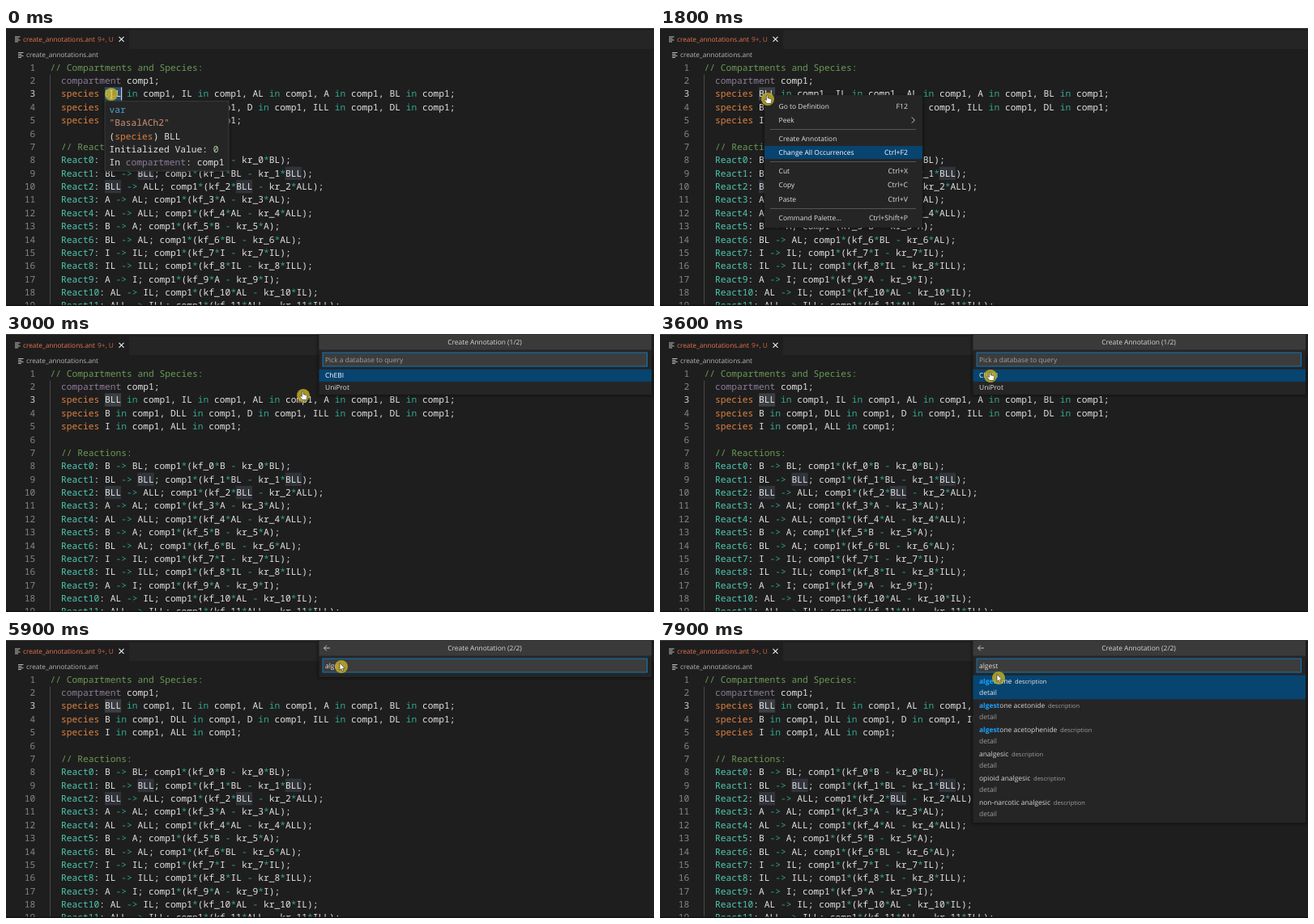
Animation of 800 by 344 pixels, one loop 8000 ms. Source, as an HTML page:

```html
<!DOCTYPE html>
<html lang="en">
<head>
<meta charset="utf-8">
<title>Create annotation</title>
<style>
  html, body { margin: 0; width: 100%; height: 100%; overflow: hidden; background: #1e1e1e; }
  svg { display: block; width: 100vw; height: 100vh; }
  text { white-space: pre; text-rendering: geometricPrecision; }
  .mono { font: 11.25px "Noto Sans Mono", "DejaVu Sans Mono", monospace; }
  .ui { font: 8.45px "Open Sans", "Noto Sans", sans-serif; }
  .file { font-size: 8.3px; }
  .keys { font-size: 8.75px; }
  .small { font-size: 7.5px; }
  .match { font-weight: 700; fill: #18a3ff; }
</style>
</head>
<body>
<svg id="stage" viewBox="0 0 800 344"></svg>
<script>
const LOOP = 8000;
const CHAR = 6.75, ROW = 16.38, CODE_X = 54.4, BASE_Y = 52.6;
const C = {
  text: '#e2e2e2', comment: '#6a9955', species: '#dd8040', compartment: '#8c7b98',
  label: '#4ec9b0', op: '#2fa88f', string: '#ce9178', number: '#b5cea8', type: '#4aa3c7',
  panel: '#252526', focus: '#074470', ui: '#e0e0e0', dim: '#9d9d9d', word: '#30343a'
};

const stage = document.getElementById('stage');

function el(parent, tag, attrs = {}, content) {
  const node = document.createElementNS('http://www.w3.org/2000/svg', tag);
  for (const key in attrs) node.setAttribute(key, attrs[key]);
  if (content !== undefined) node.textContent = content;
  parent.appendChild(node);
  return node;
}
const group = (parent = stage) => el(parent, 'g');
const rect = (g, x, y, width, height, fill, more) => el(g, 'rect', { x, y, width, height, fill, ...more });
const line = (g, d, stroke, width = 1) =>
  el(g, 'path', { d, stroke, 'stroke-width': width, fill: 'none' });
const ui = (g, x, mid, content, fill = C.ui, more) =>
  el(g, 'text', { class: 'ui', x, y: mid + 2.8, fill, ...more }, content);
const show = (node, on) => { node.style.display = on ? '' : 'none'; };

// Row of [text, colour] parts in the code font
function mono(g, x, y, parts, more) {
  const t = el(g, 'text', { class: 'mono', x, y, ...more });
  parts.forEach(([s, fill]) => el(t, 'tspan', { fill }, s));
}

function shadowed(g, x, y, w, h, border) {
  for (let i = 4; i > 0; i--) {
    rect(g, x - i, y - i + 2, w + 2 * i, h + 2 * i - 2, '#000', { opacity: 0.07, rx: i });
  }
  return rect(g, x, y, w, h, C.panel, border ? { stroke: border, 'stroke-width': 0.7 } : {});
}

// ---- Editor ----
const pairs = ('B BL,BL BLL,BLL ALL,A AL,AL ALL,B A,BL AL,I IL,IL ILL,A I,AL IL,ALL ILL')
  .split(',').map(p => p.split(' '));
const declare = names => '  species ' + names.split(' ').map(n => n + ' in comp1').join(', ') + ';';
const source = [
  '// Compartments and Species:',
  '  compartment comp1;',
  declare('BLL IL AL A BL'),
  declare('B DLL D ILL DL'),
  declare('I ALL'),
  '',
  '  // Reactions:',
  ...pairs.map(([a, b], n) => `  React${n}: ${a} -> ${b}; comp1*(kf_${n}*${a} - kr_${n}*${b});`)
];

function colorOf(token) {
  if (token.startsWith('//')) return C.comment;
  if (token === 'species') return C.species;
  if (token === 'compartment') return C.compartment;
  if (/^React/.test(token)) return C.label;
  if (/^(in|->|\*|-)$/.test(token)) return C.op;
  return C.text;
}
const tokens = s => (s.match(/\/\/.*|\w+|->|[*-]|\s+|[^\w\s*-]+/g) || []).map(t => [t, colorOf(t)]);

function fileIcon(g, x, y) {
  [6.5, 4.5, 6.5, 4].forEach((w, i) => rect(g, x, y + i * 2, w, 0.9, '#cccccc'));
}

const editor = group();
rect(editor, 0, 0, 800, 344, '#1e1e1e');
rect(editor, 152, 3, 648, 23, '#252526');
rect(editor, 0, 0, 800, 1, '#3c3c3c');
fileIcon(editor, 11, 10.5);
ui(editor, 21, 13.9, 'create_annotations.ant', '#ea7450', { class: 'ui file' });
ui(editor, 113, 13.9, '9+, U', '#cf6747', { class: 'ui file' });
line(editor, 'M139.5 10.8l6 6m0-6l-6 6', '#f0f0f0', 1.1);
fileIcon(editor, 15, 30);
ui(editor, 25, 33.4, 'create_annotations.ant', '#b8b8b8', { class: 'ui file' });
rect(editor, 54, 57.5, 1, 285, '#484848');

source.forEach((s, i) => {
  const y = BASE_Y + i * ROW;
  for (const m of s.matchAll(/\bBLL\b/g)) {
    rect(editor, CODE_X + m.index * CHAR, y - 12, 3 * CHAR, ROW, i === 2 ? '#3b3e42' : C.word);
  }
});
const selection = group();
rect(selection, 121.9, 73.4, 20.2, ROW, '#264f78');
rect(selection, 142, 73.4, 1.2, ROW, '#d0d0d0');

const code = group();
source.forEach((s, i) => {
  const y = BASE_Y + i * ROW;
  mono(code, 36.3, y, [[String(i + 1), i === 2 ? '#d0d0d0' : '#858585']], { 'text-anchor': 'end' });
  mono(code, CODE_X, y, tokens(s));
});
rect(code, 0, 342.6, 800, 1.4, '#111');

// ---- Hover card ----
const hover = group();
shadowed(hover, 122, 90.3, 153, 86.7, '#454545');
[
  [['var', C.type]],
  [['"BasalACh2"', C.string]],
  [['(', C.text], ['species', C.species], [') BLL', C.text]],
  [['Initialized Value: ', C.text], ['0', C.number]],
  [['In ', C.text], ['compartment', C.compartment], [': comp1', C.text]]
].forEach((parts, i) => mono(hover, 127.6, 104.8 + i * ROW, parts));

// ---- Context menu ----
const menu = group();
shadowed(menu, 129, 83, 195, 164);
const menuFocus = rect(menu, 129, 146, 195, 16, C.focus);
const menuLabels = [
  [97, 'Go to Definition', 'F12'], [114, 'Peek', ''],
  [137, 'Create Annotation', ''], [154.2, 'Change All Occurrences', 'Ctrl+F2'],
  [177, 'Cut', 'Ctrl+X'], [194.5, 'Copy', 'Ctrl+C'], [211.8, 'Paste', 'Ctrl+V'],
  [235, 'Command Palette...', 'Ctrl+Shift+P']
].map(([y, label, keys]) => [
  ui(menu, 146.6, y, label),
  ui(menu, 306, y, keys, C.ui, { class: 'ui keys', 'text-anchor': 'end' })
]);
[125, 165, 223].forEach(y => rect(menu, 136, y, 180, 1, '#555556'));
line(menu, 'M310.8 110.3l3.6 3.7l-3.6 3.7', '#d8d8d8', 0.9);

// ---- Quick pick ----
const pick = group();
const PX = 386.5, PW = 410.5;
function panel(height) {
  const g = group(pick);
  shadowed(g, PX, 1, PW, height - 1);
  return g;
}
const panels = { choose: panel(75), input: panel(46), results: panel(226) };
rect(pick, PX, 1, PW, 18.5, '#3a3a3b');
const title = ui(pick, 591, 10.3, '', '#d8d8d8', { 'text-anchor': 'middle' });
const back = line(pick, 'M400 10h-7.5m3.3-3.3l-3.3 3.3l3.3 3.3', '#d0d0d0', 0.9);
rect(pick, 391, 23, 400.5, 17, '#3c3c3c', { stroke: '#0a78bd', 'stroke-width': 1 });
const marked = rect(pick, 393.8, 26, 14, 11.5, '#1a6cb0');
const field = ui(pick, 394, 32, '');

rect(panels.choose, PX, 43.7, PW, 15.2, C.focus);
ui(panels.choose, 394, 51.3, 'ChEBI', '#fff');
ui(panels.choose, 394, 66.6, 'UniProt');

rect(panels.results, PX, 43.7, PW, 29.6, C.focus);
['algestone', 'algestone acetonide', 'algestone acetophenide', 'analgesic', 'opioid analgesic',
  'non-narcotic analgesic'].forEach((name, i) => {
  const y = 51.6 + i * 30, fill = i ? C.dim : '#e8e8e8';
  const t = ui(panels.results, 394, y, '', i ? '#d8d8d8' : '#fff');
  const hit = name.startsWith('algest') ? 6 : 0;
  if (hit) el(t, 'tspan', { class: 'match' }, name.slice(0, hit));
  el(t, 'tspan', {}, name.slice(hit));
  el(t, 'tspan', { class: 'small', fill, dx: 3.8 }, 'description');
  ui(panels.results, 394, y + 13.8, 'detail', fill);
});

// ---- Pointer ----
const pointer = group();
el(pointer, 'circle', { r: 8, fill: '#bfac25', opacity: 0.85 });
const shapes = {
  beam: line(pointer, 'M-1.8 -5h3.6M0 -5v10M-1.8 5h3.6', '#e8e2a0', 0.8),
  hand: el(pointer, 'path', {
    d: 'M-1.6 -4.5q.9 -1 1.7 0v3.2l3.6 .9q1.2 .4 1.1 1.6l-.7 4.3h-5.2l-3 -4q-.3 -1.4 1 -1l1.5 1z',
    fill: '#fff', stroke: '#222', 'stroke-width': 0.6
  }),
  arrow: el(pointer, 'path', {
    d: 'M-2 -4.5v9l2 -1.9l1.4 3.1l1.5 -.7l-1.4 -3h2.9z',
    fill: '#fff', stroke: '#222', 'stroke-width': 0.6
  })
};

// ---- Timeline: [start ms, value...], each held until the next ----
const path = [
  [0, 130, 82, 'beam'], [100, 132, 82, 'beam'], [300, 136, 82, 'beam'], [500, 144, 83, 'beam'],
  [600, 153, 83, 'beam'], [800, 152, 83, 'beam'], [1000, 135, 82, 'beam'], [1100, 119, 82, 'beam'],
  [1300, 133, 88, 'hand'], [1900, 138, 112, 'hand'], [2000, 148, 142, 'hand'], [2100, 152, 152, 'hand'],
  [2300, 153, 148, 'hand'], [2800, 260, 110, 'hand'], [2900, 330, 87, 'hand'], [3000, 367, 76, 'hand'],
  [3100, 380, 70, 'hand'], [3300, 392, 63, 'hand'], [3400, 402, 56, 'hand'], [3500, 408, 52, 'hand'],
  [3900, 412, 41, 'arrow'], [4000, 414, 33, 'arrow'], [7800, 416, 40, 'arrow'], [7900, 418, 47, 'arrow']
];
const typed = [
  [0, ''], [3800, 'BLL'], [4800, 'a'], [5000, 'al'], [5300, 'alg'], [5600, 'alge'],
  [6300, 'alges'], [6600, 'algest']
];
const MENU_IN = 1300, FOCUS_IN = 1800, FOCUS_UP = 2300;
const PICK_IN = 2600, INPUT_IN = 3800, TYPE_IN = 4800, LIST_IN = 7300;
const at = (table, t) => table.findLast(step => step[0] <= t);

function render(t) {
  show(selection, t < 1000);
  show(hover, t < 1000);
  show(menu, t >= MENU_IN && t < PICK_IN);
  show(menuFocus, t >= FOCUS_IN);
  menuFocus.setAttribute('y', t < FOCUS_UP ? 146 : 129);
  const focused = t < FOCUS_IN ? -1 : t < FOCUS_UP ? 3 : 2;
  menuLabels.forEach((row, i) =>
    row.forEach(label => label.setAttribute('fill', i === focused ? '#fff' : C.ui)));

  const choosing = t < INPUT_IN;
  show(pick, t >= PICK_IN);
  show(panels.choose, choosing);
  show(panels.input, !choosing && t < LIST_IN);
  show(panels.results, t >= LIST_IN);
  show(back, !choosing);
  show(marked, !choosing && t < TYPE_IN);
  title.textContent = `Create Annotation (${choosing ? 1 : 2}/2)`;
  field.textContent = choosing ? 'Pick a database to query' : at(typed, t)[1];
  field.setAttribute('fill', choosing ? '#a0a0a0' : C.ui);

  const [, x, y, kind] = at(path, t);
  pointer.setAttribute('transform', `translate(${x} ${y})`);
  for (const name in shapes) show(shapes[name], name === kind);
}

const start = performance.now();
function tick() {
  render((performance.now() - start) % LOOP);
  requestAnimationFrame(tick);
}
tick();
</script>
</body>
</html>
```
